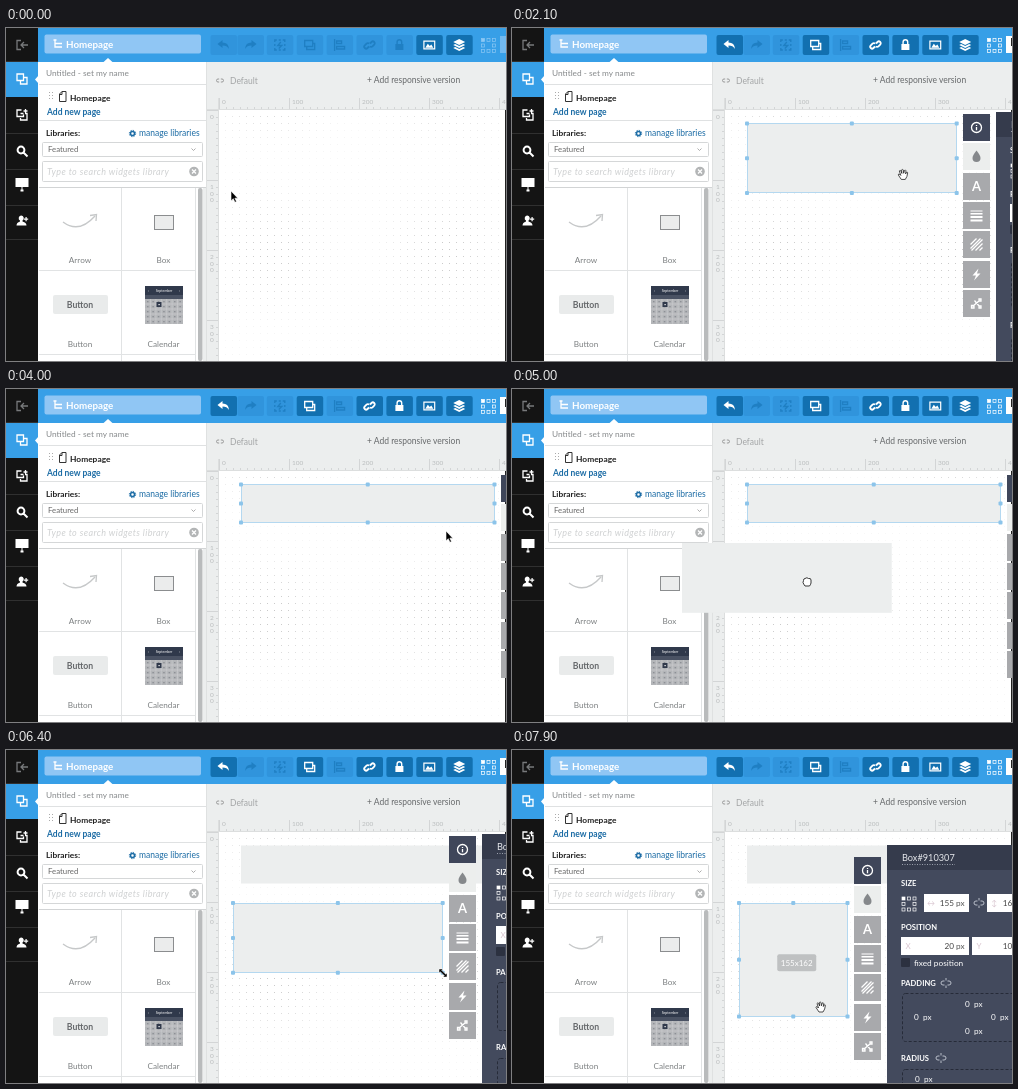
Recreate the animation shown at these times as an HTML page. Size 500 px wide and 333 px high, loop 8 s.

```html
<!DOCTYPE html>
<html lang="en">
<head>
<meta charset="utf-8">
<title>Page editor</title>
<style>
html, body { margin: 0; width: 100%; height: 100%; overflow: hidden; background: #fff; }
svg { display: block; width: 500px; height: 333px; font-family: Lato, "Open Sans", sans-serif; }
</style>
</head>
<body>
<svg viewBox="0 0 500 333">
  <g id="chrome"></g>
  <g id="tools"></g>
  <g id="live"></g>
</svg>
<script>
const LOOP = 8000, STEP = 100, ZOOM = 0.7, ORIGIN = 213;
const GREY = '#eceeee', BLUE = '#379fe7', LINK = '#1c6ca5', SLATE = '#434a5d', DARK = '#353b4c', SEL = '#8cc4ea';
const $ = id => document.getElementById(id);

const rect = (x, y, w, h, fill, extra = '') =>
  `<rect x="${x}" y="${y}" width="${w}" height="${h}" fill="${fill}" ${extra}/>`;
const text = (x, y, size, str, fill, extra = '') =>
  `<text x="${x}" y="${y}" font-size="${size}" fill="${fill}" ${extra}>${str}</text>`;
const line = (d, color, extra = '') => `<path d="${d}" fill="none" stroke="${color}" ${extra}/>`;
const group = (x, y, body) => `<g transform="translate(${x} ${y})">${body}</g>`;
const range = (n, f) => Array.from({ length: n }, (_, i) => f(i)).join('');
const BOLD = 'font-weight="700"', MID = 'text-anchor="middle"', END = 'text-anchor="end"';

// Icons are centred on 0,0: [path, filled?]
const ICONS = {
  undo: ['M-6-1l5-4v2.6q6 0 6.5 6.4q-2-3.4-6.5-3.4V3z', 1],
  redo: ['M6-1l-5-4v2.6q-6 0-6.5 6.4q2-3.4 6.5-3.4V3z', 1],
  magic: ['M-5-3v-2h2M-1-5h2M3-5h2v2M5-1v2M5 3v2h-2M1 5h-2M-3 5h-2v-2M-5 1v-2M1-3l-3 3.5h4l-3 3'],
  copy: ['M-5-4.5h8v6h-8zM-3 2v2.5h8v-6h-1.5'],
  align: ['M-5-6V6M-3-4h5v2.5h-5zM-3 1.5h8v2.5h-8z'],
  link: ['M-.5 1.5l-1.5 1.5a1.9 1.9 0 0 1-2.7-2.7l1.7-1.7a1.9 1.9 0 0 1 2.7 0M.5-1.5l1.5-1.500a1.900 1.900 0 0 1 2.700 2.700l-1.700 1.700a1.900 1.900 0 0 1-2.700 0'],
  lock: ['M-4-1h1v-2a3 3 0 0 1 6 0v2h1v6h-8zM-1.6-1h3.2v-2a1.6 1.6 0 0 0-3.2 0z', 1],
  image: ['M-6-4.5h12v9h-12zM-4.8-3.3v6.6h9.6v-6.6zM-4 2.7l2.5-4 2 2.2 1.5-1.4 2 3.2z', 1],
  layers: ['M0-6l6 3-6 3-6-3zM-6 0l2-1 4 2 4-2 2 1-6 3zM-6 3l2-1 4 2 4-2 2 1-6 3z', 1],
  exit: ['M-1-4.5h-4v9h4M6 0h-7M2-3l-3 3 3 3'],
  pages: ['M-5-5h6.5v6.5h-6.5zM-1.5 1.5v3.5h6.5v-6.5h-3.5'],
  widgets: ['M-.5-5h-4.5v6.5h6.5v-2M-1.5 3v2h6.500v-6.500h-2M-1.500-1.500h3M3.500-6v4M1.500-4h4'],
  search: ['M2.4-1a3.4 3.4 0 1 1-6.8 0a3.4 3.4 0 1 1 6.8 0M1.5 1.5l4 4'],
  board: ['M-6.500-7h13v9h-13zM-.5 2h1v2.500h1v2h-3v-2h1z', 1],
  user: ['M-1-5.5a2.7 2.7 0 0 1 1.5 5v1q4 1 4 4h-10q0-3 3.500-4v-1a2.700 2.700 0 0 1 1-5M3.500-4h1.200v1.500h1.500v1.200h-1.500v1.500h-1.200v-1.500h-1.500v-1.200h1.500z', 1],
  tree: ['M-3-4v7h5M-3-.5h5M-4.500-4h3M1-.5h3M1 3h3'],
  info: ['M5 0a5 5 0 1 1-10 0a5 5 0 1 1 10 0M0-2.600v1M0-.5v3.300'],
  drop: ['M0-6q4 5 4 7.500a4 4 0 0 1-8 0q0-2.500 4-7.500', 1],
  lines: ['M-6-5h12v1h-12zM-6-2.500h12v1.500h-12zM-6 .5h12v2h-12zM-6 4h12v2h-12z', 1],
  hatch: ['M-6 0l6-6M-6 4l10-10M-5 6l11-11M-1 6l7-7M3 6l3-3'],
  bolt: ['M2-6l-6 7h3.500l-2 5 6.500-7h-3.500z', 1],
  nodes: ['M-4 3l7-6M-2-3l5 6M-5 2h2.500v2.500h-2.500zM2.500-4.500h2v2h-2zM2.500 2.500h2v2h-2z'],
  chain: ['M-.8-1.500h-1.200a1.500 1.500 0 0 0 0 3h1.200M.8-1.500h1.200a1.500 1.500 0 0 1 0 3h-1.200'],
  unlink: ['M-1.500-2h-1.500a2 2 0 0 0 0 4h1.500M1.500-2h1.500a2 2 0 0 1 0 4h-1.500M0-5v2.500M0 2.500v2.500']
};
function icon(name, x, y, color, width = 1.3) {
  const [d, filled] = ICONS[name];
  return group(x, y, filled ? `<path d="${d}" fill="${color}" fill-rule="evenodd"/>`
                            : line(d, color, `stroke-width="${width}"`));
}
const anchors = (x, y, color) => range(9, i => i === 4 ? '' :
  rect(x + i % 3 * 5.5, y + (i / 3 | 0) * 5.5, 3, 3, i ? 'none' : color, `stroke="${color}" stroke-width=".7"`));

// The dot grid fades in and out in wide waves
function dotGrid() {
  const wave = (v, peak) => .5 + .5 * Math.cos((v - peak) * Math.PI / 87);
  let s = '';
  for (let x = ORIGIN + 6; x < 499; x += 7)
    for (let y = 88; y < 333; y += 7)
      s += rect(x, y, 1, 1, '#777', `opacity="${(.06 + .34 * wave(x, 265) * wave(y, 225)).toFixed(2)}"`);
  return s;
}

function workspace() {
  let s = rect(200, 34, 300, 299, GREY) + rect(ORIGIN, 82, 287, 251, '#fff') + dotGrid();
  s += line(range(41, i => `M${ORIGIN + .5 + i * 7} 82v${i % 10 ? -3 : -12}`), '#d3d5d6');
  s += line(range(36, i => `M${ORIGIN} ${82.5 + i * 7}h${i % 10 ? -3 : -12}`), '#d3d5d6');
  s += line('M201 81.5h299M212.500 70v263', '#dcdede');
  for (let i = 0; i < 5; i++) {
    const n = String(i * 100);
    s += text(ORIGIN + 3 + i * 70, 76, 6.5, n, '#b9bcbd');
    if (i < 4) s += [...n].map((c, k) => text(204, 91 + i * 70 + k * 6.5, 6.5, c, '#b9bcbd')).join('');
  }
  return s + rect(499, 82, 1, 251, '#222')
    + icon('chain', 214, 52.500, '#999', 1) + text(224, 56, 8.5, 'Default', '#a3a5a6')
    + text(361, 55, 8.5, '+ Add responsive version', '#66696b');
}

function calendar() {
  return rect(139, 258, 38, 38, '#b4b6b9') + rect(139, 258, 38, 9, '#30394b')
    + text(158, 264, 3.5, 'September', '#fff', MID) + text(142, 264, 4, '‹', '#fff') + text(173, 264, 4, '›', '#fff')
    + rect(139, 267, 38, 4, '#4a5263')
    + line(range(6, i => `M${144.5 + i * 5.4} 271v25`) + range(4, i => `M139 ${276 + i * 5}h38`), '#cdcfd1', 'stroke-width=".6"')
    + range(35, i => rect(141 + i % 7 * 5.4, 273 + (i / 7 | 0) * 5, 1.5, 1.3, '#8d9096'))
    + rect(150.5, 274, 5, 5, '#30394b') + rect(152.5, 276, 1.2, 1.2, '#fff');
}

function sidebar() {
  let s = rect(32, 34, 168, 299, '#fff') + rect(197, 160, 3, 173, GREY) + rect(200, 34, 1, 299, '#dfe1e1');
  s += line('M33 56.5h167M33 92.5h167', '#dfe1e2') + line('M33 159.5h167', '#d2d4d5');
  s += text(40, 48, 8.3, 'Untitled - set my name', '#85888a');
  s += range(6, i => rect(43 + i % 2 * 3, 64 + (i / 2 | 0) * 3, 1, 1, '#aaa'));
  s += line('M53.5 66l2.5-2.5h4v10h-6.5zM53.5 66.5h2.5v-3', '#333');
  s += text(64, 73, 8.4, 'Homepage', '#222', BOLD) + text(41, 87, 8.5, 'Add new page', LINK, BOLD);
  s += text(40, 108, 8.4, 'Libraries:', '#222', BOLD) + text(133, 108, 8.5, 'manage libraries', LINK);
  s += `<circle cx="126.5" cy="105.5" r="2" fill="none" stroke="${LINK}" stroke-width="1.5"/>`
    + `<circle cx="126.5" cy="105.5" r="3.2" fill="none" stroke="${LINK}" stroke-dasharray="1.3 1.2"/>`;
  s += rect(36.5, 114.5, 160, 14, '#fff', 'rx="1" stroke="#d5d7d8"') + text(42, 124, 7.8, 'Featured', '#666');
  s += line('M185.5 120.5l2 2 2-2', '#999', 'stroke-width=".8"');
  s += rect(36.5, 133.5, 160, 20, '#fff', 'rx="1" stroke="#d5d7d8"');
  s += text(41, 146.5, 9, 'Type to search widgets library', '#cfd1d2', 'font-style="italic" letter-spacing=".4"');
  s += '<circle cx="188" cy="143.5" r="4.8" fill="#b3b5b6"/>' + line('M186 141.5l4 4M190 141.5l-4 4', '#fff', 'stroke-width="1.3"');
  s += line('M115.5 160v173M189.5 160v173M33 242.5h156M33 326.5h156', '#e1e3e4');
  s += rect(192, 160, 4.5, 173, '#b9bbbc', 'rx="2"');
  s += line('M57 194q16 12 32-6M84 187.5l6.5-1-.5 6.5', '#c6c8c9', 'stroke-width="1.3"');
  s += rect(148.5, 187.5, 19, 14, '#ebecec', 'stroke="#8b8d8f"');
  s += rect(47, 267, 55, 19, '#e9ebeb', 'rx="2"') + text(74, 279.5, 8.7, 'Button', '#66696c', `${BOLD} ${MID}`);
  s += calendar();
  [['Arrow', 74, 235], ['Box', 157.5, 235], ['Button', 74, 319], ['Calendar', 157.5, 319]]
    .forEach(([n, x, y]) => s += text(x, y, 8.2, n, '#7d8082', MID));
  return s;
}

function frame() {
  let s = rect(0, 0, 500, 34, BLUE) + rect(38.5, 6.5, 156.5, 19, '#90c6f4', 'rx="2"');
  s += icon('tree', 52, 16, '#fff') + text(60, 20, 9.8, 'Homepage', '#fff', BOLD);
  s += '<path d="M97 34.5l5-4.5 5 4.5z" fill="#fff"/>';
  s += rect(0, 0, 32, 333, '#141414') + rect(0, 34, 32, 35, BLUE);
  s += '<path d="M32.5 47.5l-3.5 4 3.5 4z" fill="#fff"/>';
  s += line('M0 33.5h32M0 105.5h32M0 141.5h32M0 177.5h32M0 211.5h32', '#303030');
  ['exit', 'pages', 'widgets', 'search', 'board', 'user'].forEach((n, i) =>
    s += icon(n, 16, [17, 51, 87, 123, 157, 193][i], i ? '#fff' : '#77797b', n === 'search' ? 2 : 1.3));
  return s;
}

function toolbar(editing) {
  const names = ['undo', 'redo', 'magic', 'copy', 'align', 'link', 'lock', 'image', 'layers'];
  const lit = editing ? ['undo', 'copy', 'link', 'lock', 'image', 'layers'] : ['image', 'layers'];
  const s = names.map((n, i) => {
    const on = lit.includes(n), x = i < 2 ? 217.5 + i * 27 : 214 + i * 29.9;
    return rect(x - 13, 7, 26.5, 20, on ? '#1270b0' : '#3094dc', 'rx="2"')
      + icon(n, x, 17, on ? '#fff' : '#1f7fc3', n === 'link' ? 1.8 : 1.3);
  }).join('');
  return s + anchors(475.5, 10.5, editing ? '#fff' : '#8cc8f4')
    + rect(494, 8, 6, 17, editing ? '#fff' : '#72b9ef') + (editing ? rect(499, 10, 1, 8, '#222') : '');
}

function strip(x, y) {
  return ['info', 'drop', '', 'lines', 'hatch', 'bolt', 'nodes'].map((n, i) => {
    const top = Math.round(y + i * 29.3);
    return rect(x, top, 27, 27, ['#3f465a', '#eceeed'][i] || '#a8a9ac')
      + (n ? icon(n, x + 13.5, top + 13.5, i === 1 ? '#85888b' : '#fff')
           : text(x + 13.5, top + 18, 13, 'A', '#fff', `${BOLD} ${MID}`));
  }).join('');
}

function field(x, y, w, hint, value) {
  return rect(x, y, w, 18, '#fff') + text(x + 7, y + 12, 8, hint, '#d9c6d0', MID)
    + text(x + w - 15, y + 12, 8.2, value, '#444', END) + text(x + w - 13, y + 12, 8.2, 'px', '#555');
}

function panel(x, y, b) {
  const px = v => Math.round(v / ZOOM);
  const title = (top, str) => text(13, top, 7.6, str, '#fff', BOLD);
  const pad = (left, top) => text(left, top, 8.2, '0', '#fff') + text(left + 9, top, 8.2, 'px', '#fff');
  const dashed = (top, h) => rect(14.5, top + .5, 131, h, 'none', 'rx="3" stroke="#262b38" stroke-dasharray="3 2"');
  const unlink = (left, top) => icon('unlink', left, top, '#b9bec9', 1);
  return group(x, y, rect(-1, -1, 150, 260, SLATE) + rect(-1, -1, 150, 25, DARK)
    + text(14, 14.5, 9.2, 'Box#910307', '#e6e8ec') + line('M14 18.5h53', '#9aa0ad', 'stroke-dasharray="1 1.5"')
    + title(40, 'SIZE') + anchors(14, 51, '#fff')
    + field(36, 48, 45, '↔', px(b.w)) + unlink(91, 57) + field(99, 48, 45, '↕', px(b.h))
    + title(84, 'POSITION') + field(13, 91, 68, 'X', px(b.x - ORIGIN)) + field(84, 91, 60, 'Y', px(b.y - 82))
    + rect(13, 112, 9, 9, '#2c3140', 'rx="1"') + text(26, 119.5, 8.3, 'fixed position', '#fff')
    + title(139.5, 'PADDING') + unlink(58, 137) + dashed(147, 48)
    + pad(77, 161) + pad(26, 174) + pad(103, 174) + pad(77, 188)
    + title(215, 'RADIUS') + unlink(53, 212) + dashed(223, 48) + pad(27, 236));
}

function selection(b) {
  const xs = [b.x, b.x + b.w / 2, b.x + b.w], ys = [b.y, b.y + b.h / 2, b.y + b.h];
  const left = Math.floor(xs[0]) + .5, top = Math.floor(ys[0]) + .5;
  let s = rect(left, top, Math.floor(b.w), Math.floor(b.h), 'none', 'stroke="#b4d8f0"');
  ys.forEach((y, j) => xs.forEach((x, i) => {
    if (i !== 1 || j !== 1) s += rect(x - 2, y - 2, 4, 4, SEL, 'rx="1"');
  }));
  const cy = ys[1], side = Math.round(xs[2] + 6.4);
  return s + strip(side, Math.round(Math.max(85.5, cy - 102.5))) + panel(side + 34, Math.round(Math.max(85, cy - 113.7)), b);
}

function sizeLabel(b) {
  const x = b.x + b.w / 2 + 3.5, y = b.y + b.h / 2 + 3;
  return rect(x - 19.5, y - 8.5, 39, 17, '#bfc1c2', 'rx="2"')
    + text(x, y + 3, 8, `${Math.round(b.w / ZOOM)}x${Math.round(b.h / ZOOM)}`, '#fff', MID);
}

const POINTERS = {
  arrow: '<path d="M0 0V9.8L2.3 7.7 3.9 11.3 5.5 10.5 3.9 7.2H6.8Z" fill="#000" stroke="#fff" stroke-width=".6"/>',
  grab: '<path d="M-3.5-1.5q0-2 1.500-2q2-1.500 3.500 0q2.500-.5 2.500 1.500v3q-.5 2-1.500 3h-4.500q-1.500-2-2-3.500z" fill="#fff" stroke="#222" stroke-width=".9"/>',
  hand: '<path d="M-2 5l-3-4.5q0-1.5 1.5-.5l1 1-1.5-4.5q.8-1.2 1.6 0l1 2.5-.3-3.5q.9-1 1.7 0l.4 3.3.8-2.8q1-.8 1.5.3l-.4 3.2 1-1.6q1-.5 1.1.5q-.3 4-2.4 6.6z" fill="#fff" stroke="#222" stroke-width=".8"/>',
  resize: '<path d="M-4-4h4l-1.3 1.3 4 4L4 0v4H0l1.3-1.3-4-4L-4 0z" fill="#000" stroke="#fff" stroke-width=".5"/>'
};

// Piecewise linear path through [time, x, y] keys
function along(keys, t) {
  const i = keys.findIndex(k => k[0] > t);
  if (i < 1) return keys[i ? keys.length - 1 : 0].slice(1);
  const [a, b] = [keys[i - 1], keys[i]], p = (t - a[0]) / (b[0] - a[0]);
  return [1, 2].map(k => a[k] + (b[k] - a[k]) * p);
}
const POINTER_PATH = [[0, 225, 163], [700, 158, 195], [900, 158, 195], [1200, 312, 141], [1600, 351, 131],
  [1800, 351, 131], [2500, 445, 167], [2900, 445, 167], [3500, 489, 134], [3700, 489, 134], [4000, 440, 142],
  [4500, 158, 195], [4600, 158, 195], [5000, 295, 193], [5300, 352, 192], [5500, 352, 192], [6200, 437, 223],
  [6400, 437, 223], [7200, 336, 267], [7500, 309, 257]];
const POINTER_KINDS = [[0, 'arrow'], [900, 'grab'], [1700, 'hand'], [2500, 'resize'], [3700, 'arrow'],
  [4600, 'grab'], [5400, 'hand'], [6200, 'resize'], [7300, 'hand']];
const BOXES = [
  { held: [900, 1700], pos: [[900, 42, 159], [1200, 196, 105], [1600, 235, 95.5]], size: [[2900, 209.7, 69.5], [3500, 253.5, 38]],
    picked: [[1800, 2800], [3600, 5400]], label: [3000, 3700] },
  { held: [4600, 5400], pos: [[4600, 33, 156], [5000, 170, 154], [5300, 227, 153]], size: [[6400, 209.7, 69.8], [7200, 108.5, 113.4]],
    picked: [[5400, 6500], [7300, LOOP]], label: [6500, LOOP] }
];
const within = (t, [a, b]) => t >= a && t < b;

function draw(t) {
  $('tools').innerHTML = toolbar(t >= 1800);
  let resting = '', overlays = '', lifted = '';
  for (const { held, pos, size, picked, label } of BOXES) {
    if (t < held[0]) continue;
    const [x, y] = along(pos, t), [w, h] = along(size, t), b = { x, y, w, h };
    const fill = rect(x, y, w, h, GREY);
    if (within(t, held)) lifted += fill;
    else resting += fill;
    if (picked.some(span => within(t, span))) overlays += selection(b);
    if (within(t, label)) overlays += sizeLabel(b);
  }
  const kind = POINTER_KINDS.filter(k => k[0] <= t).pop()[1];
  $('live').innerHTML = resting + overlays + lifted + group(...along(POINTER_PATH, t), POINTERS[kind]);
}

$('chrome').innerHTML = workspace() + sidebar() + frame();
const start = performance.now();
let shown = -1;
function tick() {
  const t = Math.floor((performance.now() - start) % LOOP / STEP) * STEP;
  if (t !== shown) draw(shown = t);
  requestAnimationFrame(tick);
}
tick();
</script>
</body>
</html>
```
